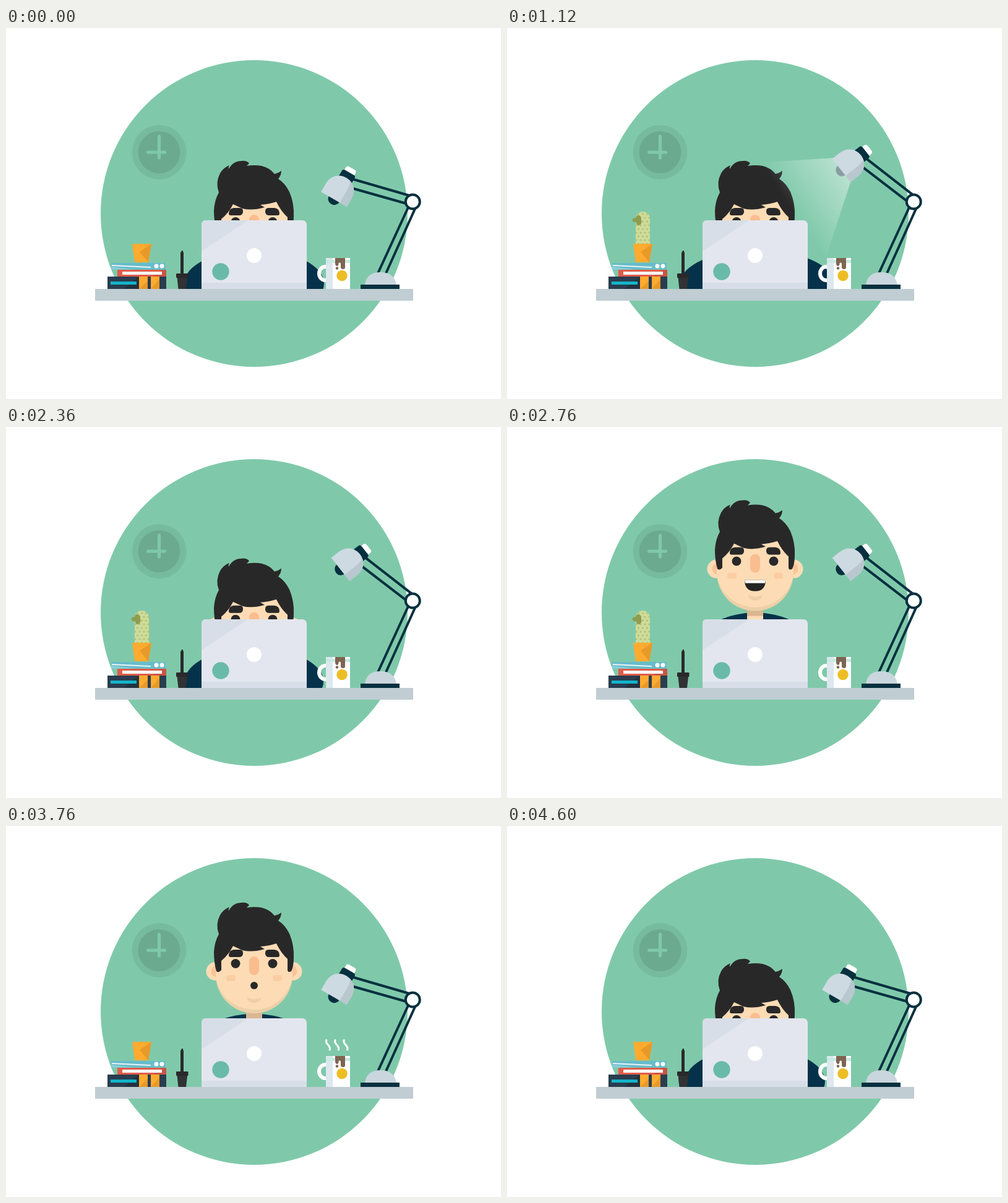
An HTML page with a canvas that plays this animation: 800x600 px, repeating every 4.64 s.

```html
<!DOCTYPE html>
<html lang="en">
<head>
<meta charset="utf-8">
<title>Desk</title>
<style>
html, body { margin: 0; width: 100%; height: 100%; overflow: hidden; background: #fff; }
canvas { display: block; width: 800px; height: 600px; }
</style>
</head>
<body>
<canvas id="stage" width="800" height="600"></canvas>
<script>
const ctx = document.getElementById('stage').getContext('2d');
const LOOP = 4640, STEP = 40, DESK_TOP = 422;
const GREEN = '#7fc9aa', NAVY = '#06303f', SKIN = '#fddcb5', BLACK = '#292829';
const ORANGE = '#ffab30', DARK_ORANGE = '#e79a29', SLATE = '#2a3d4f';

// Motion tracks: [time in ms, value], eased between neighbours.
const LAMP_ANGLE = [[40, 0], [430, 32], [660, 19], [860, 22.5], [1020, 21.7],
  [3200, 21.7], [3480, -5], [3630, 1.5], [3740, 0]];
const CACTUS_SIZE = [[100, 0], [430, 1.096], [640, .96], [820, 1], [3240, 1], [3500, 0]];
const HEAD_DROP = [[2320, 97], [2720, 0], [2960, 8], [3160, 6], [3900, 6], [4340, 101], [4500, 97]];
const SHOULDERS = [[0, 0], [1100, 1], [2200, 0]];
const BEAM = [[880, 0], [960, 1], [1500, 1], [1580, 0]];
const STEAM_STARTS = [1340, 3600];

const clamp = v => Math.min(1, Math.max(0, v));

function track(keys, t) {
  if (t <= keys[0][0]) return keys[0][1];
  for (let i = 1; i < keys.length; i++) {
    const [t0, a] = keys[i - 1], [t1, b] = keys[i];
    if (t < t1) {
      const u = (t - t0) / (t1 - t0);
      return a + (b - a) * (1 - Math.cos(Math.PI * u)) / 2;
    }
  }
  return keys[keys.length - 1][1];
}

function rect(x0, y0, x1, y1, color, radius = 0) {
  ctx.fillStyle = color;
  ctx.beginPath();
  ctx.roundRect(x0, y0, x1 - x0, y1 - y0, radius);
  ctx.fill();
}

function oval(x, y, rx, ry, color) {
  ctx.fillStyle = color;
  ctx.beginPath();
  ctx.ellipse(x, y, rx, ry, 0, 0, Math.PI * 2);
  ctx.fill();
}

const disc = (x, y, r, color) => oval(x, y, r, r, color);

function shape(path, color) {
  ctx.fillStyle = color;
  ctx.fill(new Path2D(path));
}

function line(path, color, width, cap = 'round') {
  ctx.strokeStyle = color;
  ctx.lineWidth = width;
  ctx.lineCap = cap;
  ctx.lineJoin = 'round';
  ctx.stroke(new Path2D(path));
}

function within(draw) {
  ctx.save();
  draw();
  ctx.restore();
}

function drawBackdrop() {
  rect(0, 0, 800, 600, '#fff');
  disc(401, 300, 248, GREEN);
  disc(247.5, 201, 44, '#77bb9f');
  disc(247.5, 201, 34, '#6caa8f');
  line('M247.5 175V210M229.5 201H256.5', GREEN, 5);
}

function drawBody(drop, spread) {
  const k = drop / 97;
  within(() => {
    ctx.beginPath();
    ctx.rect(0, 0, 800, DESK_TOP);
    ctx.clip();
    oval(401 + 3 * spread, 340 + 73 * k, 80 + 33 * k + 11 * spread, 40 + 14 * k, '#05324a');
  });
}

const HAIR = 'M340 229Q336 215 336 198Q337 181 344 169Q338 153 346 138Q351 129 361 125' +
  'Q359 128 360 131Q367 118 381 118Q389 117 393 122L389 126Q402 124 413 126Q426 129 434 139' +
  'Q440 138 445 134Q445 141 440 147Q451 154 458 168Q466 187 465 207Q465 221 461 229' +
  'Q455 232 455 226V209Q444 199 437 184Q425 188 411 189L418 193Q398 199 382 195' +
  'L367 188Q360 202 348 212V227Q344 232 340 229Z';

function drawHead(drop, smiling) {
  within(() => {
    ctx.translate(0, drop);
    rect(388, 282, 414, 314, SKIN);
    rect(388, 282, 414, 305, '#d9b791');
    for (const side of [-1, 1]) {
      disc(401 + 62.5 * side, 229, 15, SKIN);
      disc(401 + 60 * side, 229, 9.5, '#fbc397');
    }
    within(() => {
      ctx.beginPath();
      ctx.ellipse(401, 235, 62, 62, 0, 0, Math.PI * 2);
      ctx.clip();
      rect(338, 170, 464, 300, '#ecd0a8');
      oval(401, 228, 63, 63, SKIN);
    });
    shape('M389 271Q401 277 413 271Q411 280 401 280Q391 280 389 271Z', '#efcfa4');
    for (const x of [363.5, 438.5]) rect(x - 7.5, 235, x + 7.5, 245, '#fbcda2', 4);
    rect(393, 205, 409, 235, '#fabd8f', 8);
    for (const x of [371, 431]) disc(x, 216.5, 7.5, BLACK);
    shape('M360 203Q360 195 368 194H377Q383 194 383 199V201Q382 206 377 206H363Q360 206 360 203Z', BLACK);
    shape('M442 203Q442 195 434 194H425Q419 194 419 199V201Q420 206 425 206H439Q442 206 442 203Z', BLACK);
    if (smiling) {
      shape('M384 247H418Q418 265 401 265Q384 265 384 247Z', '#252424');
      shape('M384 247H418L417 252H385Z', '#fff');
    } else {
      disc(401, 252, 6, BLACK);
    }
    shape(HAIR, BLACK);
  });
}

function drawLaptop() {
  rect(316, 311, 486, 422, '#e3e6ee', [7, 7, 0, 0]);
  shape('M323 311H391L316 361V318Q316 311 323 311Z', '#d7dee7');
  rect(316, 412, 486, 422, '#d8dee8');
  disc(401, 368, 12, '#fff');
  disc(347, 394, 13.7, '#6abaaa');
}

function drawBooks() {
  rect(164, 402, 259, 422, SLATE);
  shape('M190 422L215 402V422Z', '#23323f');
  rect(169, 410, 211, 415, '#13b4c9');
  rect(215, 402, 229, 422, ORANGE);
  rect(234, 402, 248, 422, ORANGE);
  shape('M215 422L229 409V422ZM234 422L248 406V422Z', DARK_ORANGE);
  rect(180, 391, 259, 402, '#e15b49');
  shape('M252 391H259V402H237Z', '#c95545');
  rect(188, 394, 252, 399, '#f8f6f5');
  rect(170, 380, 258, 390.5, '#67bccb');
  shape('M171 383L234 386V388L171 385Z', '#e9f5f6');
  shape('M170 390.5V386L207 390.5Z', '#8ccfda');
  disc(243, 385, 3.5, '#fff');
  disc(252, 385, 3.5, '#fff');
}

function drawCactus(size) {
  if (size > 0.01) within(() => {
    ctx.translate(219.5, 350);
    ctx.scale(size, size);
    within(() => {
      ctx.beginPath();
      ctx.roundRect(-11.5, -53, 23, 55, [11.5, 11.5, 0, 0]);
      ctx.clip();
      rect(-12, -54, 12, 2, '#cfdb98');
      for (let row = 0; row < 9; row++)
        for (let col = -2; col < 3; col++)
          disc(col * 7 + (row % 2) * 3.5, -49 + row * 6, 1.6, '#b1c07b');
    });
    shape('M-3-44Q-5-48-9-47Q-12-45-11-43Q-17-43-17-39Q-16-35-11-36Q-10-30-6-31Q-2-32-2-37Z', '#8d9d50');
  });
  shape('M204 349H235L230 379H208Z', ORANGE);
  shape('M235 349L216 362L230 379Z', DARK_ORANGE);
}

function drawPenCup() {
  shape('M282 400V364Q282 362 283.5 362V360H286V362Q287 362 287 364V400Z', '#292a2c');
  rect(275, 397, 294.5, 404, '#29292b', 1);
  shape('M276.5 404H293L291 422H278.5Z', '#313234');
}

function drawMug() {
  ctx.strokeStyle = '#fff';
  ctx.lineWidth = 6;
  ctx.beginPath();
  ctx.ellipse(516, 397, 10, 11, 0, 0, Math.PI * 2);
  ctx.stroke();
  rect(517, 372, 556, 422, '#fff');
  rect(517, 372, 528, 422, '#dce7ee');
  rect(517, 375, 556, 380, '#c9ebe0');
  shape('M532 372H548V387Q548 390 545 390Q541 390 541 387V381Q540 378 537.5 380V382Q537 385 535 385Q532 384 532 381Z', '#7e6451');
  disc(535, 388.5, 2.2, '#7e6451');
  disc(543, 400.5, 8.7, '#edbd25');
}

// A fixed wave revealed from below, then erased from below.
function drawSteam(t) {
  for (const start of STEAM_STARTS) {
    const top = 362 - 44 * clamp((t - start) / 450);
    const bottom = 362 - 44 * clamp((t - start - 300) / 450);
    if (bottom - top < 1) continue;
    for (const x of [520.5, 534.7, 549]) {
      let path = '';
      for (let y = top; y <= bottom; y += .5)
        path += (path ? 'L' : 'M') + (x - 3 * Math.cos(Math.PI * (y - 325) / 11.6)) + ' ' + y;
      line(path, '#fff', 3);
    }
  }
}

function drawBeam(alpha) {
  if (!alpha) return;
  const glow = ctx.createLinearGradient(546, 226, 455, 286);
  glow.addColorStop(0, `rgba(255,255,255,${.46 * alpha})`);
  glow.addColorStop(1, 'rgba(255,255,255,0)');
  shape('M530 210L556 247L515 372H400L418 217Z', glow);
}

function drawLamp(angle, light) {
  line('M599.5 400L651 288M612.5 400L663 288', NAVY, 4, 'butt');
  shape('M580 416Q582 395 605 395Q628 395 631 416Z', '#c9d6de');
  rect(573, 415, 636, 422, NAVY);
  within(() => {
    ctx.translate(657, 281);
    ctx.rotate(angle * Math.PI / 180);
    line('M-98-37L-5-10M-98-22L-8 3.5', NAVY, 4, 'butt');
    ctx.translate(-127, -4);
    ctx.rotate(Math.PI / 6);
    disc(0, -1, 10, light > .5 ? '#8b9da4' : NAVY);
    rect(-9, -58, 9, -44, '#fff', 4);
    rect(-12, -50, 12, -34, NAVY, 4);
    shape('M-24 0V-15C-24-30-14-40 0-40C14-40 24-30 24-15V0Z', '#cddae2');
    shape('M11 0V-20Q11-32 8-39C18-35 24-27 24-15V0Z', '#b9c7ce');
  });
  disc(657.3, 281, 13.5, NAVY);
  disc(657.3, 281, 9.5, '#fff');
}

function draw(t) {
  const drop = track(HEAD_DROP, t);
  const light = track(BEAM, t);
  drawBackdrop();
  drawBody(drop, track(SHOULDERS, t));
  drawHead(drop, t < 3320);
  drawBeam(light);
  drawLaptop();
  drawBooks();
  drawCactus(track(CACTUS_SIZE, t));
  drawPenCup();
  drawMug();
  drawSteam(t);
  drawLamp(track(LAMP_ANGLE, t), light);
  rect(144, DESK_TOP, 658, 441, '#c0cdd2');
}

const origin = performance.now();
function tick() {
  const t = (performance.now() - origin) % LOOP;
  draw(Math.floor(t / STEP) * STEP);
  requestAnimationFrame(tick);
}
tick();
</script>
</body>
</html>
```
